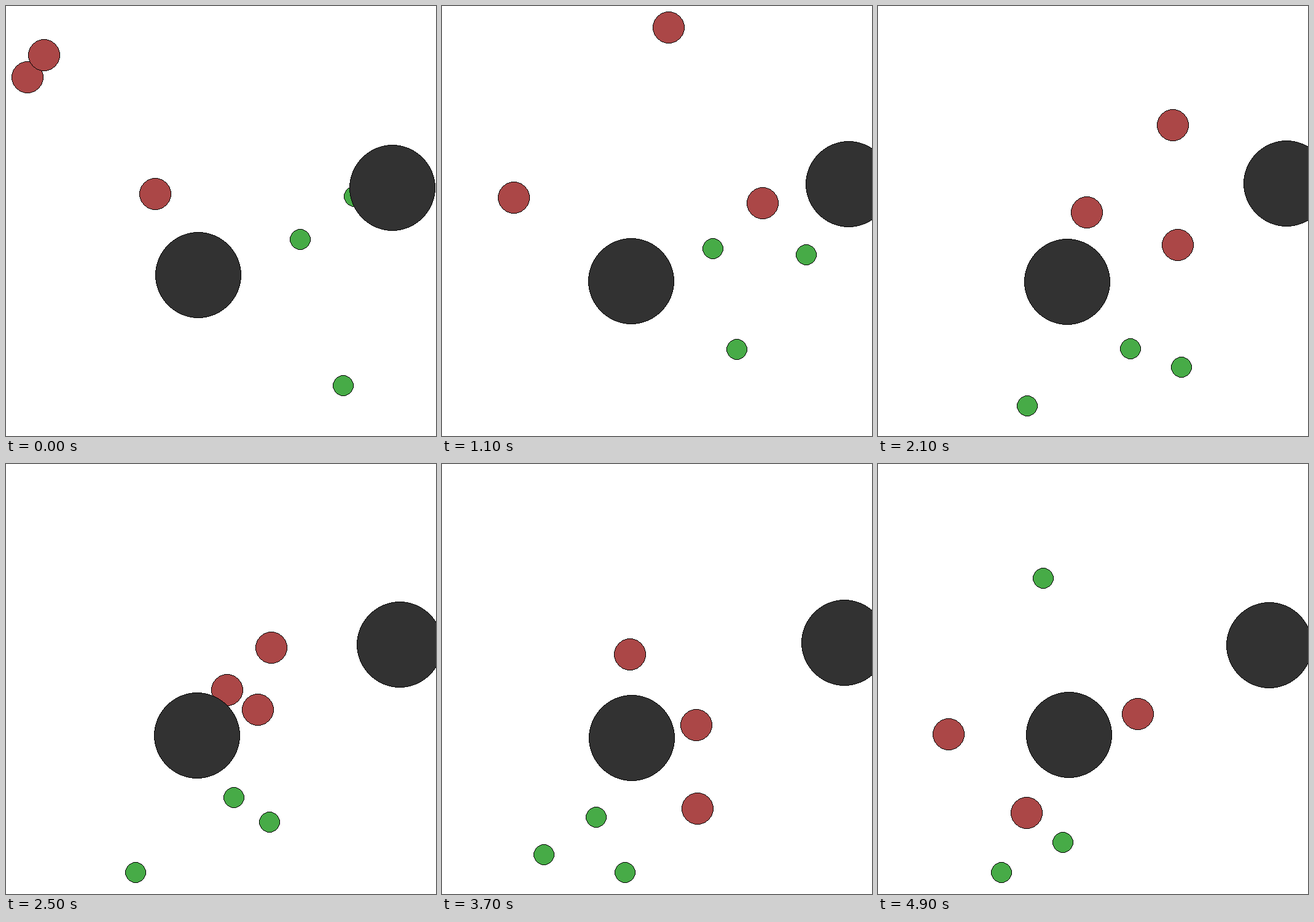
Animation of 700x700 px, one loop 5000 ms. Source, as an HTML page with a canvas:

```html
<!DOCTYPE html>
<html lang="en">
<head>
<meta charset="utf-8">
<title>Pursuit</title>
<style>
  html, body { margin: 0; width: 100%; height: 100%; overflow: hidden; background: #fff; }
  canvas { display: block; width: 100vw; height: 100vh; image-rendering: pixelated; }
</style>
</head>
<body>
<canvas id="stage" width="700" height="700"></canvas>
<script>
const STEP = 100, STEPS = 50, SIZE = 700, REACH = 315, CLEARANCE = 72;
const red = disc("#ab4747", 26), green = disc("#47ab47", 17), rock = disc("#323232", 70);
const ctx = document.getElementById("stage").getContext("2d");

// World space has its origin at the stage centre; all runners share these beats.
const beats = [0, 7, 15, 21, 29, 37, 49];
const rocks = [[-42.3, 99.4], [315, -60.6]];
const chasers = [
  "-121,-50 68,-49 232,3 138,39 22,65 66,77.5 80,62.6",
  "-355.6,-264 -344.6,-84 -90,-20 -10,-14 15,47 -45,-41 -258,99",
  "-325,-305 -123.6,-326 117,-284 130,-156 48,45.5 68,218 -118.5,239"
].map(readPath);
const runaways = [
  "145.6,34 109,13 78,107 61,208 -22,210 -102,232 -89,-180",
  "252,-47 177,135 68,267 -107,301 -168,367.5 -190,295 -163.5,345.7",
  "225,302.6 226.5,53.6 263,71 144,238 36,261 -53.7,325.3 -54,292"
].map(readPath);

function readPath(text) {
  return text.split(" ").map(pair => pair.split(",").map(Number));
}

// Midpoint circle: a pixel disc with a one-pixel black rim.
function disc(color, r) {
  const image = document.createElement("canvas");
  image.width = image.height = 2 * r;
  const pen = image.getContext("2d"), points = [];
  let f = 1 - r, x = 0, y = r;
  while (x < y) {
    if (f >= 0) f += 2 - 2 * y--;
    f += 2 * ++x + 1;
    points.push([x, y], [y, x]);
  }
  const rows = h => [r + h - 1, r - h];
  pen.fillStyle = color;
  for (const [w, h] of points)
    for (const row of rows(h)) pen.fillRect(r - w, row, 2 * w, 1);
  pen.fillStyle = "#000";
  for (const [w, h] of points)
    for (const row of rows(h))
      for (const col of rows(w)) pen.fillRect(col, row, 1, 1);
  return image;
}

function slope(path, i, axis) {
  return (path[i + 1][axis] - path[i][axis]) / (beats[i + 1] - beats[i]);
}

// Starts at rest, stops at turning points and never overshoots.
function tangent(path, i, axis) {
  if (i === 0) return 0;
  const before = slope(path, i - 1, axis);
  if (i === path.length - 1) return before;
  const after = slope(path, i, axis);
  if (before * after <= 0) return 0;
  const limit = 3 * Math.min(Math.abs(before), Math.abs(after));
  return Math.sign(before) * Math.min(Math.abs(before + after) / 2, limit);
}

function glide(path, step) {
  let i = 0;
  while (i < beats.length - 2 && step >= beats[i + 1]) i++;
  const span = beats[i + 1] - beats[i];
  const u = (step - beats[i]) / span, v = 1 - u;
  return [0, 1].map(axis =>
    v * v * (1 + 2 * u) * path[i][axis] + u * u * (3 - 2 * u) * path[i + 1][axis]
    + span * u * v * (v * tangent(path, i, axis) - u * tangent(path, i + 1, axis)));
}

// Runners slide around a rock instead of crossing it.
function skirt(spot) {
  return rocks.reduce(([x, y], [rx, ry]) => {
    const gap = Math.hypot(x - rx, y - ry) || 1;
    const push = Math.max(1, CLEARANCE / gap);
    return [rx + (x - rx) * push, ry + (y - ry) * push];
  }, spot);
}

function draw(ms) {
  const step = Math.floor(ms / STEP) % STEPS;
  const place = image => path => ({ image, spot: skirt(glide(path, step)) });
  const [left, middle, front] = chasers.map(place(red));
  const bodies = [
    left, middle, ...runaways.map(place(green)),
    ...rocks.map(spot => ({ image: rock, spot })), front
  ];
  // The view zooms so that the farthest body sits on its border.
  const zoom = REACH / Math.max(...bodies.flatMap(b => b.spot.map(Math.abs)));
  const toPixel = (p, image) => Math.round(SIZE / 2 + p * zoom) - image.width / 2;
  ctx.fillStyle = "#fff";
  ctx.fillRect(0, 0, SIZE, SIZE);
  for (const { image, spot: [x, y] } of bodies)
    ctx.drawImage(image, toPixel(x, image), toPixel(y, image));
}

const start = performance.now();
function tick() {
  draw(performance.now() - start);
  requestAnimationFrame(tick);
}
tick();
</script>
</body>
</html>
```
